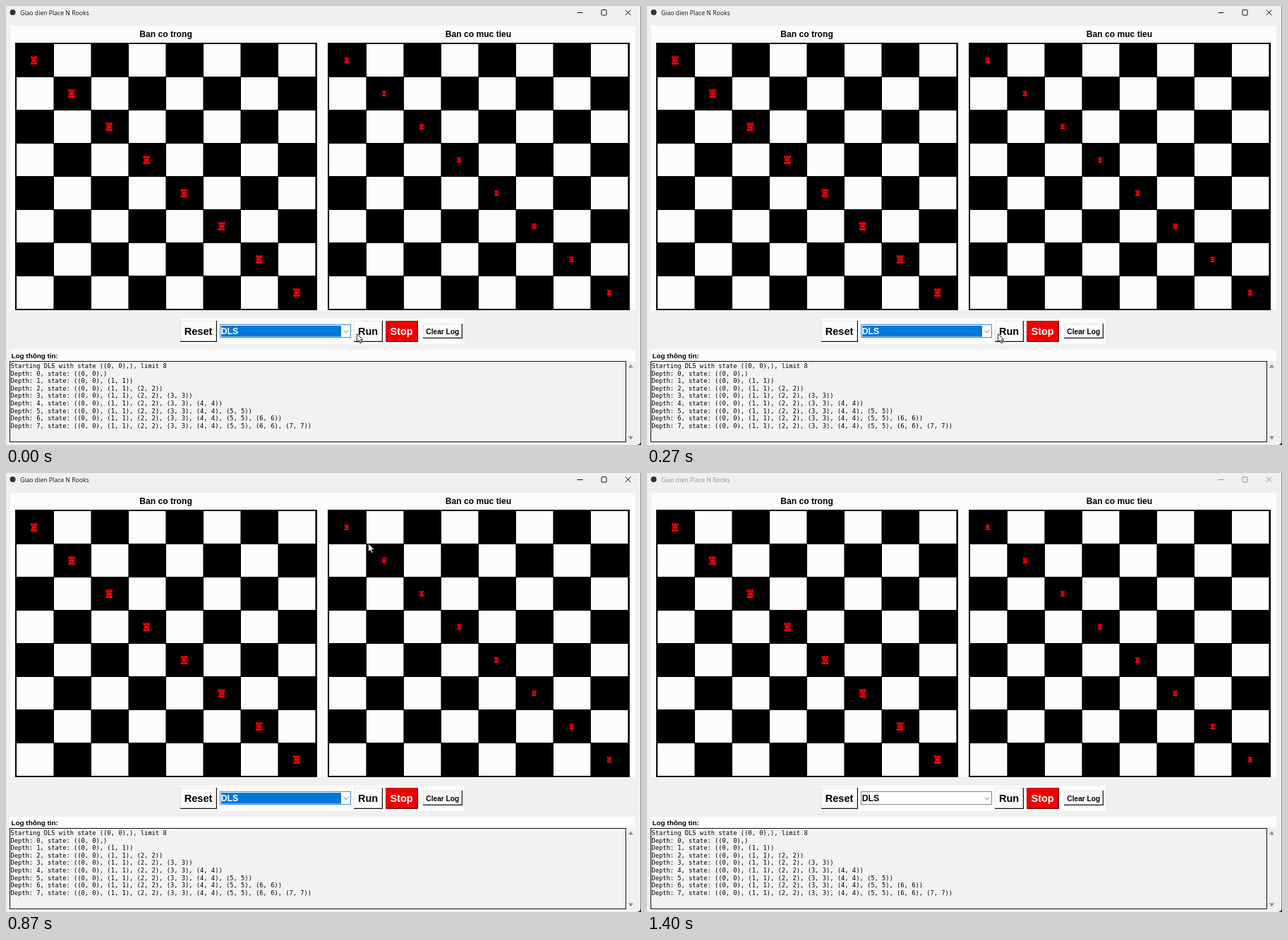
These frames come from a looping animation (900 px wide and 622 px high, 1960 ms). An HTML page:

```html
<!DOCTYPE html>
<html lang="vi">
<head>
<meta charset="utf-8">
<title>Giao dien Place N Rooks</title>
<style>
html, body { margin: 0; width: 100%; height: 100%; overflow: hidden; background: #f0f0f0; }
svg { display: block; width: 900px; height: 622px; }
text { white-space: pre; }
.bold { font-family: "Liberation Sans", Arial, sans-serif; font-weight: 700; }
.mono { font-family: "DejaVu Sans Mono", monospace; font-size: 8.75px; }
.ui { font-family: "Open Sans", "Noto Sans", sans-serif; font-size: 8.7px; }
</style>
</head>
<body>
<svg id="stage" viewBox="0 0 900 622" xmlns="http://www.w3.org/2000/svg"></svg>
<script>
const NS = "http://www.w3.org/2000/svg";
const stage = document.getElementById("stage");
const LOOP = 1960, JUMP = 870, EXIT = 900, BLUR = 1330;
const PAPER = "#fcfcfc", RED = "#f2000c";

function add(tag, attrs, parent = stage) {
  const el = document.createElementNS(NS, tag);
  for (const k in attrs) el.setAttribute(k, attrs[k]);
  return parent.appendChild(el);
}
const box = (x, y, w, h, fill, more) => add("rect", { x, y, width: w, height: h, fill, ...more });
const line = (d, stroke, width = 1) => add("path", { d, stroke, "stroke-width": width, fill: "none" });
function label(str, x, y, cls, size, more) {
  const el = add("text", { x, y, class: cls, fill: "#000", ...more });
  if (size) el.style.fontSize = size + "px";
  el.textContent = str;
  return el;
}

function rook(x, y, scale) {
  const g = add("g", { transform: `translate(${x} ${y}) scale(${scale})` });
  add("path", {
    fill: RED,
    d: "M-4.8-5.8h2.2v1.2h1.5v-1.2h2.2v1.2h1.5v-1.2h2.2v3l-1.2 1v4.4l1.2 1v2.6h-9.6v-2.6l1.2-1v-4.4l-1.2-1z"
  }, g);
  add("path", { d: "M-3.2-1.9h6.4M-3.2 2.8h6.4", stroke: "#300", "stroke-width": 0.8 }, g);
}

function board(x, title, mid, scale) {
  const cw = 53.1, ch = 47.05;
  label(title, mid, 44.3, "bold", 12.1, { "text-anchor": "middle" });
  box(x, 52, 428, 379, "#000");
  for (let r = 0; r < 8; r++) {
    for (let c = 0; c < 8; c++) {
      if ((r + c) % 2 === 0) continue;
      const left = Math.round(x + 1.6 + c * cw);
      const top = Math.round(53.5 + r * ch), low = Math.round(53.5 + (r + 1) * ch);
      box(left, top, 52.4, low - top - 1, PAPER);
    }
  }
  for (let i = 0; i < 8; i++) rook(x + 26.8 + i * 53.15, 76.8 + i * 47, scale);
}

function button(x, y, w, h, str, size, tx, ty, skin = {}) {
  const { fill = PAPER, light = "#e4e4e4", dark = "#111", ink = "#000" } = skin;
  box(x, y, w, h, fill);
  line(`M${x + .5} ${y + h}V${y + .5}H${x + w}`, light);
  line(`M${x} ${y + h - .6}H${x + w - .6}V${y}`, dark, 1.2);
  label(str, tx, ty, "bold", size, { fill: ink });
}

// Window and title bar
box(0, 0, 900, 622, "#f0f0f0");
line("M899.5 0V622", "#8a8a8a");
add("path", { d: "M900 617V622H895Q899 621 900 617", fill: "#222" });
add("circle", { cx: 9.5, cy: 9, r: 4, fill: "#26343f" });
const name = label("Giao dien Place N Rooks", 20, 12.8, "ui");
const icons = line("M809.5 9.5h8M844.5 5.5h6l.5.5v6.5l-.5.5h-6l-.5-.5v-6.5zM878 5.5l7.5 7.5M885.5 5.5l-7.5 7.5", "#111");

// Boards
box(6, 28, 886, 403, PAPER);
board(13, "Ban co trong", 226.5, 1);
board(456, "Ban co muc tieu", 669.5, .66);

// Controls
box(247, 443, 403, 36, PAPER);
button(247, 446, 52, 30, "Reset", 14.6, 252.7, 466);
const combo = box(303.5, 451.5, 185, 18, "#fff", { "stroke-width": 1 });
const pick = box(305, 453, 170, 15.5, "#0078d7");
const value = label("DLS", 304.8, 465.4, "bold", 12.2);
line("M479 459.7l3 3 3-3", "#555", .9);
button(493, 446, 41, 30, "Run", 14.5, 499, 466);
button(538, 446, 46, 30, "Stop", 14.5, 544.5, 466,
  { fill: "#ee0000", light: "#c80000", dark: "#700000", ink: "#fff" });
button(591, 450, 56, 21, "Clear Log", 10.2, 595.3, 464.5);

// Log
box(5, 487, 887, 16, PAPER);
label("Log thông tin:", 7.5, 498.7, "bold", 9.9);
box(5.5, 503.5, 873, 114, "#f2f2f0", { stroke: "#111" });
add("path", { d: "M882 512.5h7l-3.5-5zM882 609.5h7l-3.5 5z", fill: "#909090" });

const lines = ["Starting DLS with state ((0, 0),), limit 8"];
for (let d = 0; d < 8; d++) {
  const cells = Array.from({ length: d + 1 }, (_, i) => `(${i}, ${i})`).join(", ");
  lines.push(`Depth: ${d}, state: (${cells}${d ? "" : ","})`);
}
lines.forEach((s, i) => label(s, 6.4, 513.2 + i * 10.55, "mono"));

const cursor = add("path", {
  d: "M0 0V11.6L2.7 9.2 4.5 13.4 6.4 12.6 4.7 8.5H8.4z",
  fill: "#fff", stroke: "#111", "stroke-width": .9, "stroke-linejoin": "round"
});

function draw(t) {
  const focus = t < BLUR;
  name.setAttribute("fill", focus ? "#111" : "#949494");
  icons.setAttribute("stroke", focus ? "#111" : "#949494");
  combo.setAttribute("stroke", focus ? "#3a8fd6" : "#858585");
  pick.setAttribute("visibility", focus ? "visible" : "hidden");
  value.setAttribute("fill", focus ? "#fff" : "#000");
  // The pointer flicks straight up and out of the window
  cursor.setAttribute("visibility", t < EXIT ? "visible" : "hidden");
  cursor.setAttribute("transform", t < JUMP ? "translate(497.5 464.5)" : "translate(513.5 100)");
}

const start = performance.now();
function tick() {
  draw((performance.now() - start) % LOOP);
  requestAnimationFrame(tick);
}
tick();
</script>
</body>
</html>
```
